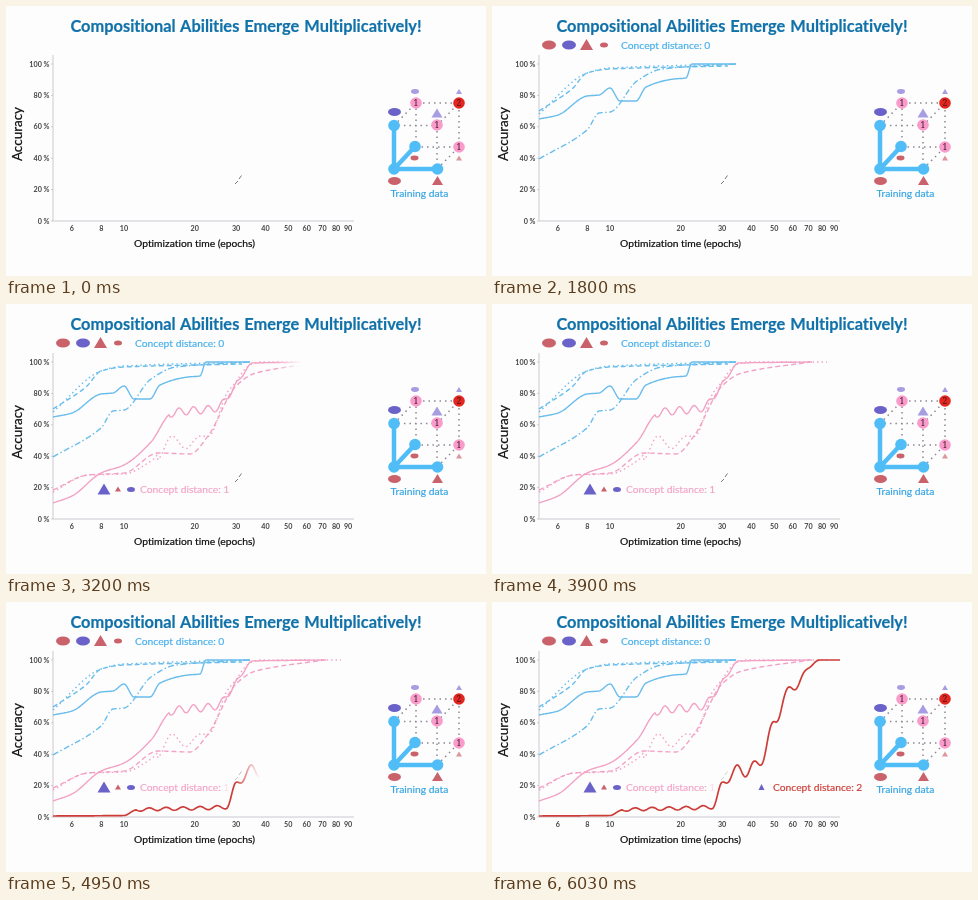
These frames come from a looping animation (480x270 px, 6.05 s). An HTML page:

```html
<!DOCTYPE html>
<html lang="en">
<head>
<meta charset="utf-8">
<title>Compositional Abilities</title>
<style>
  html, body { margin: 0; width: 100%; height: 100%; overflow: hidden; background: #fdfdfd; }
  svg { display: block; width: 480px; height: 270px; font: 10.3px Lato, sans-serif;
    font-variant-ligatures: none; }
  .title { font-size: 16.4px; font-weight: 700; fill: #1172aa; stroke: #1172aa;
    stroke-width: .2; word-spacing: 1px; }
  .tick { font-size: 7.2px; font-weight: 700; fill: #444; }
  .label { fill: #111; stroke: #111; stroke-width: .22; }
  .legend { stroke-width: .18; }
  .digit { font: 8.5px "Noto Serif", serif; fill: #421322; }
</style>
</head>
<body>
<svg id="stage" viewBox="0 0 480 270"></svg>
<script>
const LOOP = 6050, WIPE = 1000, SOFT = 26;
const LEFT = 47, TOP = 58, BASE = 215;
const BLUE = '#69bdec', PINK = '#f2a2c5', RED = '#cd3d38';
const NODE = '#50bdf7', ROSE = '#c9626a', VIOLET = '#6a62c8', LILAC = '#a69de2';

const epochX = n => 118 + 102 * Math.log(n / 10);
const ellipse = (x, y, rx, ry, fill) =>
  `<ellipse cx="${x}" cy="${y}" rx="${rx}" ry="${ry}" fill="${fill}"/>`;
const triangle = (x, y, w, h, fill) =>
  `<path d="M${x} ${y - h / 2}l${w / 2} ${h}h${-w}z" fill="${fill}"/>`;
const text = (x, y, str, cls, anchor = 'middle', more = '') =>
  `<text x="${x}" y="${y}" class="${cls}" text-anchor="${anchor}" ${more}>${str}</text>`;
const legend = (x, y, n, color) =>
  text(x, y, `Concept distance: ${n}`, 'legend', 'start', `fill="${color}" stroke="${color}"`);

// Monotone cubic through the key points, as a function of x.
function spline(keys) {
  const rise = keys.slice(1).map(([x, y], i) => (y - keys[i][1]) / (x - keys[i][0]));
  const slope = keys.map((_, i) => {
    const a = rise[i - 1] ?? rise[i], b = rise[i] ?? a;
    return a * b > 0 ? 2 * a * b / (a + b) : 0;
  });
  return x => {
    const i = Math.max(0, keys.findIndex(k => k[0] >= x) - 1);
    const [x0, y0] = keys[i], [x1, y1] = keys[i + 1];
    const w = x1 - x0, t = (x - x0) / w, s = 1 - t;
    return s * s * ((1 + 2 * t) * y0 + t * w * slope[i]) +
      t * t * ((3 - 2 * t) * y1 - s * w * slope[i + 1]);
  };
}

// The ripple is strongest at half accuracy and fades out at 0 % and 100 %.
function curve(color, dash, keys, { from = 0, peak = 0, period = 1, amp = 0 } = {}) {
  const trend = spline(keys), pts = [];
  for (let x = LEFT; x <= keys.at(-1)[0]; x++) {
    const y = trend(x), acc = (BASE - y) / (BASE - TOP);
    const wave = x < from ? 0 : Math.cos((x - peak) / period * 2 * Math.PI);
    pts.push([x, Math.max(TOP, y - amp * 4 * acc * (1 - acc) * wave).toFixed(2)]);
  }
  return `<polyline points="${pts.join(' ')}" fill="none" stroke="${color}"
    stroke-width="${color === RED ? 1.7 : 1.4}" stroke-linejoin="round" stroke-dasharray="${dash}"/>`;
}

function axes() {
  let out = `<path d="M${LEFT} 49V${BASE}H348" fill="none" stroke="#cfc9d2"/>`;
  for (let p = 0; p <= 100; p += 20) {
    const y = BASE - (BASE - TOP) * p / 100;
    out += `<path d="M45 ${y}h2" stroke="#bbb" stroke-width=".7"/>` +
      text(43.5, y + 2.5, `${p} %`, 'tick', 'end');
  }
  for (const n of [6, 8, 10, 20, 30, 40, 50, 60, 70, 80, 90])
    out += text(epochX(n), 225, n, 'tick');
  return out +
    text(188.5, 241, 'Optimization time (epochs)', 'label') +
    text(0, 0, 'Accuracy', 'label', 'middle',
      'transform="translate(15.5 128) rotate(-90)" style="font-size:13.5px"');
}

function cube() {
  const node = (x, y, fill, digit = '') =>
    ellipse(x, y, 5.8, 5.8, fill) + text(x, y + 3, digit, 'digit');
  return `<path d="M388 119.5L410 97H453L431 119.5H388M431 119.5V163L453 141V97M410 97V141H453"
      fill="none" stroke="#8d8793" stroke-width="1.5" stroke-dasharray="1.5 4"/>
    <path d="M388 119.5V163H431.5M388 163L409 140.5" fill="none" stroke="${NODE}" stroke-width="4.5"/>` +
    node(388, 119.5, NODE) + node(388, 163, NODE) +
    node(431.5, 163, NODE) + node(409, 140.5, NODE) +
    node(410, 97, '#f99ccb', 1) + node(431, 119, '#f99ccb', 1) +
    node(453, 141, '#f99ccb', 1) + node(453, 97, '#e3261e', 2) +
    ellipse(409, 85.5, 4, 2.4, LILAC) + triangle(453, 85.5, 6, 5, LILAC) +
    ellipse(388.5, 106, 6.5, 4, VIOLET) + triangle(431, 107, 11, 9, LILAC) +
    ellipse(388.5, 175, 6.5, 4, ROSE) + triangle(431.5, 174.5, 11, 9, ROSE) +
    ellipse(408.5, 152, 4, 2.4, ROSE) + triangle(453, 152, 6, 5, '#dc969c') +
    text(413.5, 191, 'Training data', 'legend', 'middle', 'fill="#35a5e2" stroke="#35a5e2"');
}

const blueGroup =
  curve(BLUE, 'none', [[47, 113], [66, 109], [95, 90], [107, 89], [118, 82], [128, 95],
    [144, 95], [154, 81], [182, 73], [194, 72], [200, 58], [244, 58]]) +
  curve(BLUE, '5 3', [[47, 105], [80, 83], [95, 67], [118, 63], [236, 60]]) +
  curve(BLUE, '1.5 3', [[47, 108], [95, 67], [118, 62], [244, 58]]) +
  curve(BLUE, '6 2.5 1.5 2.5', [[47, 153], [95, 124], [107, 107], [118, 106], [145, 75],
    [170, 63], [244, 58]]) +
  ellipse(57, 39, 7, 4.5, ROSE) + ellipse(77, 39, 7, 4.5, VIOLET) +
  triangle(94.5, 38.5, 13, 11, ROSE) + ellipse(112, 39, 4, 2.5, ROSE) +
  legend(129, 42.5, 0, '#45aeea');

const pinkGroup =
  curve(PINK, 'none', [[47, 199], [66, 192], [95, 169], [118, 161], [145, 138], [166, 109],
    [210, 104], [232, 78], [247, 59], [320, 58]],
    { from: 164, peak: 173, period: 14.5, amp: 4.5 }) +
  curve(PINK, '5 3', [[47, 186], [82, 171], [118, 169], [152, 149], [184, 150], [202, 132],
    [230, 82], [250, 69], [318, 58]]) +
  curve(PINK, '1.5 3', [[47, 188], [82, 171], [118, 170], [145, 157], [166, 138], [190, 139],
    [240, 64], [254, 58], [335, 58]],
    { from: 152, peak: 166, period: 27, amp: 6 }) +
  triangle(98, 185, 13, 11, VIOLET) + triangle(112, 185, 6, 5, ROSE) +
  ellipse(125, 185.5, 4, 2.5, VIOLET) + legend(134, 188.5, 1, PINK);

const redGroup =
  '<rect x="217" y="168" width="22" height="22" fill="#fdfdfd" opacity=".65"/>' +
  curve(RED, 'none', [[47, 214], [118, 213.5], [130, 208], [220, 205], [230, 184], [240, 171],
    [262, 166], [284, 118], [292, 96], [304, 83], [328, 58], [348, 58]],
    { from: 130, peak: 279, period: 17, amp: 8 }) +
  triangle(269.5, 185, 6, 6, VIOLET) + legend(281, 188.5, 2, RED);

const wipes = [
  { start: 640, right: 246, body: blueGroup },
  { start: 2413, right: 336, body: pinkGroup },
  { start: 4355, right: 370, body: redGroup }
];

const stage = document.getElementById('stage');
stage.innerHTML =
  text(240, 26, 'Compositional Abilities Emerge Multiplicatively!', 'title') + axes() + cube() +
  '<path d="M229 178l3-3M233 173l2.5-3.5" stroke="#555" stroke-width=".8"/>' +
  wipes.map((w, i) => `
    <linearGradient id="edge${i}" gradientUnits="userSpaceOnUse" y1="0" y2="0">
      <stop stop-color="#fff"/><stop offset="1" stop-color="#000"/>
    </linearGradient>
    <mask id="mask${i}" maskUnits="userSpaceOnUse" x="0" y="0" width="480" height="270">
      <rect width="480" height="270" fill="url(#edge${i})"/>
    </mask>
    <g mask="url(#mask${i})">${w.body}</g>`).join('');
const edges = wipes.map((w, i) => document.getElementById('edge' + i));

function draw(now) {
  const t = now % LOOP;
  wipes.forEach((w, i) => {
    const k = Math.min(1, Math.max(0, (t - w.start) / WIPE));
    const front = LEFT - 2 + k * (w.right - LEFT + SOFT + 2);
    edges[i].setAttribute('x1', front - SOFT);
    edges[i].setAttribute('x2', front);
  });
}

const begin = performance.now();
function tick() {
  draw(performance.now() - begin);
  requestAnimationFrame(tick);
}
tick();
</script>
</body>
</html>
```
